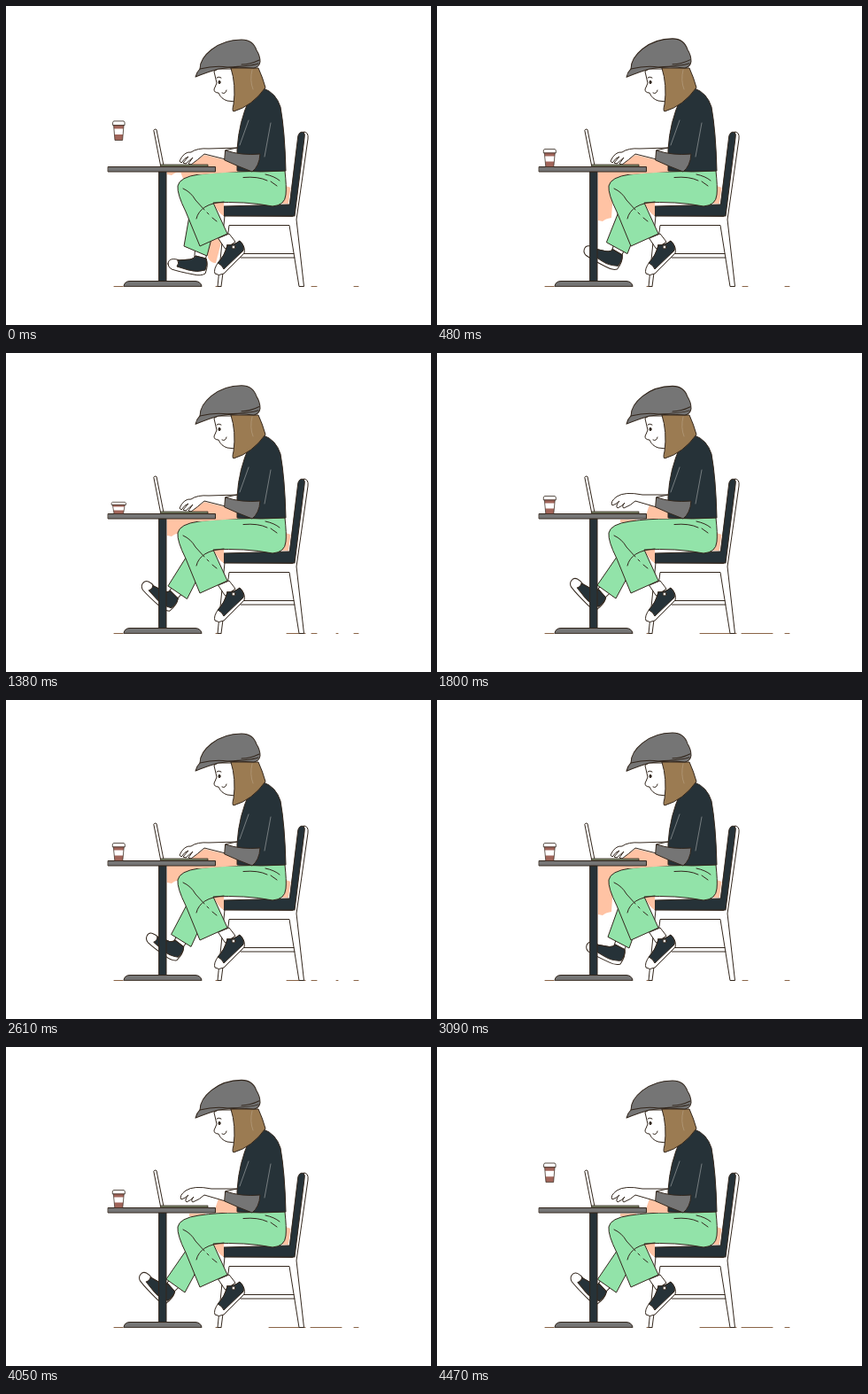
These frames come from a looping animation (480 px wide and 360 px high, 4.5 s). An HTML page:

```html
<!DOCTYPE html>
<html lang="en">
<head>
<meta charset="utf-8">
<title>Working at a table</title>
<style>
html, body { margin: 0; width: 100%; height: 100%; overflow: hidden; background: #fff; }
svg { display: block; width: 100vw; height: 100vh; }
path, circle, ellipse { stroke: #33271d; stroke-width: 1; stroke-linejoin: round; stroke-linecap: round; fill: none; }
.white { fill: #fff; }
.dark { fill: #263238; }
.grey { fill: #757575; }
.green { fill: #92e3a9; }
.hair { fill: #9b7b52; }
.skin { fill: #ffc3a4; stroke: none; }
.brown { fill: #a1655a; stroke: none; }
.light { stroke: #8b9194; stroke-width: .8; }
.ground { stroke: #8a6548; stroke-width: 1; }
</style>
</head>
<body>
<svg viewBox="0 0 480 360">
  <path class="ground" d="M122 316.500h10M237 316.500h6M345 316.500h6M393 316.500h5"/>
  <path class="ground" id="groundMid" d="M317 316.500h21M373 316.500h2"/>
  <path class="ground" id="groundLong" d="M297 316.500h41M344 316.500h35"/>

  <!-- chair -->
  <path class="white" d="M247 237L239 316.500H243L252 247.500H320L331 316.500H336.500L328 241L341 150Q342 142 336 142L324 237Z"/>
  <path d="M268 279.500H325M265 284H326"/>
  <path class="dark" d="M330 146Q332 141 336 142.500Q338 144 337 149L326 237H246V226L320 224Z"/>
  <path class="skin" d="M316 203L321.500 205L319 223H312ZM234 222H246V237Q240 234 234 222Z"/>

  <!-- far leg -->
  <path class="skin" id="shade"/>
  <path class="skin" id="ankleShade" d="M228 266L241 262L243 267L237 290Q231 290 228 284Z"/>
  <g id="farShoe">
    <path class="white" d="M-6 -6L7 -2L5 8L-7 6Z"/>
    <path class="white" d="M-37 11C-37 4 -29 5 -24 7L-12 6Q-7 5 -6 2L6 5Q9 12 5 22Q0 25 -8 23Q-24 20 -33 17Q-37 15 -37 11Z"/>
    <path class="dark" d="M-26 7L-12 6Q-7 5 -6 2L6 5Q8 11 5 18Q-4 21 -14 18L-27 14Q-24 10 -26 7Z"/>
  </g>
  <path class="green" id="farLeg"/>

  <!-- table -->
  <path class="dark" d="M173 187H181V311H173Z"/>
  <path class="grey" d="M133 316Q134 310.500 140 310.500H214Q220 311 221 316Z"/>

  <!-- near leg -->
  <path class="white" d="M240 262L252 257L259 266L248 274Z"/>
  <path class="white" d="M250 270Q258 270 264 265Q271 272 269 279L246 302Q240 305 236 302Q234 297 240 289Q247 282 250 270Z"/>
  <path class="dark" d="M250 270Q258 270 264 265Q270 271 268 276L246 297Q244 292 239 290Q247 282 250 270Z"/>
  <circle class="white" cx="257" cy="272" r="2"/>
  <path class="green" d="M315 186Q317 204 316 213Q315 225 301 226Q270 220 234 222L250 257L219 271L203 232Q193 212 194 203Q196 193 218 190Q238 187 262 187Z"/>
  <path d="M215 240Q219 223 246 221M200 206Q209 210 214 219L224 230M227 233L229 235M233 239L238 243M268 193.500Q285 192 295 197M299 198L306 203M293 190Q303 192 309 197"/>

  <!-- body and arm -->
  <path class="skin" id="armShade"/>
  <path class="dark" d="M291 93Q305 98 310 114Q315 142 316 186Q288 188 261 186V162Q263 130 275 105Z"/>
  <path class="light" d="M274 129L264 157M299 132L292 170"/>
  <path class="white" id="arm"/>
  <path class="grey" d="M248 163Q266 169 287 167Q286 181 278 187Q262 181 247 174Z"/>

  <!-- laptop and table top -->
  <path class="white" d="M167 140Q168 138 170 139.500L178 180H175Z"/>
  <path class="green" d="M175 179H228V181H175Z" style="fill:#879778;stroke-width:.8"/>
  <path class="grey" d="M115.500 181.500H236.500V187H115.500Z"/>

  <!-- head -->
  <path class="white" d="M235 74L238 87L235 94Q235 98 240 98Q243 105 250 107L259 108L262 71H240Z"/>
  <ellipse cx="241" cy="86" rx="1" ry="1.800" style="fill:#222"/>
  <path d="M238 81Q240 79 243 81M244 98Q248 100 249 95"/>
  <path class="hair" d="M254 70H285Q290 81 293 92Q278 113 257 119Q255 118 257 111Q260 89 254 70Z"/>
  <path d="M278 72Q275 84 279 94" style="stroke:#b19a7a;stroke-width:.8"/>
  <g id="cap">
    <path class="grey" d="M219 71C219 57 238 38 266 38C276 38 281 44 283 50Q287 56 287 63Q286 69 280 70Q258 68 240 71Q229 74 214 80Q215 75 219 71Z"/>
    <path d="M219 71Q236 67 250 69Q276 68 285 65M266 66Q276 66 286 61"/>
  </g>

  <g id="cup">
    <path class="brown" d="M-6 -17H6L4.500 0H-4.500Z"/>
    <path class="white" d="M-5.500 -12H5.500L5 -6H-5Z" style="stroke:none"/>
    <path d="M-6 -16L-4.500 0H4.500L6 -16" style="stroke-width:.7"/>
    <path class="white" d="M-7 -16V-18.500L-6 -20H6L7 -18.500V-16Z" style="stroke-width:.8"/>
  </g>
</svg>
<script>
const $ = id => document.getElementById(id);
const LOOP = 4500, TAP = 375, HOP = 1125;
const mix = (a, b, k) => +(a + (b - a) * k).toFixed(2);

// Linear interpolation through [time, value] pairs
function keyed(keys, t) {
  const i = Math.max(1, keys.findIndex(k => k[0] >= t));
  const [t0, a] = keys[i - 1], [t1, b] = keys[i];
  return mix(a, b, (t - t0) / (t1 - t0));
}

const lift = [[0, 0], [90, .4], [210, .97], [255, .9], [300, 1], [345, 1], [360, .77], [375, 0]];
const squash = [[0, 1.08], [150, 1.08], [225, .67], [255, .66], [340, 1], [850, 1], [950, .78], [965, .8], [985, 1.08], [1125, 1.08]];

function draw(t) {
  const tap = t % TAP, hop = t % HOP;
  const h = keyed(lift, tap);
  const raised = tap > 275 && tap < 352;

  $('farShoe').setAttribute('transform',
    `translate(${mix(220, 188.5, h)} ${mix(280, 268.5, h)}) rotate(${34 * h})`);
  $('farLeg').setAttribute('d',
    `M210 220L${mix(201, 181, h)} ${mix(271, 262, h)}L${mix(227, 202, h)} ${mix(282, 277, h)}L${mix(238, 222, h)} 240Z`);

  const fall = Math.min(hop, HOP - hop) / 150;
  const y = 181.5 - 30 * Math.max(0, 1 - fall * fall);
  const s = keyed(squash, hop);
  $('cup').setAttribute('transform', `translate(127.3 ${y}) scale(${1 + (1 - s) * .5} ${s})`);

  const bob = Math.sin(Math.PI * tap / TAP) ** 2;
  $('cap').setAttribute('transform', `translate(0 72) scale(1 ${1 + .055 * bob}) translate(0 -72)`);

  $('arm').setAttribute('d', raised
    ? 'M261 160L232 160Q212 156 203 162Q195 168 198 172Q202 171 206 167Q201 173 204 175Q209 173 212 169Q208 174 211 175Q219 172 224 167L248 174V163Z'
    : 'M261 160L229 161Q216 160 209 165Q201 164 196 175L198 177Q202 171 206 170L200 177L203 178L211 171L206 178L209 179Q216 174 224 167L248 173V163Z');
  $('armShade').setAttribute('d', raised
    ? 'M240 171L262 178V187H207Q212 183 236 183Z'
    : 'M224 168L262 177V187L220 190Q204 190 200 188H184Q206 184 214 175Z');

  const depth = tap < 45 ? 191 : tap < 150 ? 243 : 207;
  $('shade').setAttribute('d', raised ? 'M207 188H225V191H207Z'
    : `M182 187H225L200 195L197 ${depth - 4}Q190 ${depth - 3} 187 ${depth}L182 ${depth - 1}Z`);
  $('ankleShade').style.opacity = h < .25 ? 1 : 0;
  $('groundLong').style.opacity = raised ? 1 : 0;
  $('groundMid').style.opacity = tap > 150 && !raised ? 1 : 0;
}

function tick() {
  draw(performance.now() % LOOP);
  requestAnimationFrame(tick);
}
tick();
</script>
</body>
</html>
```
